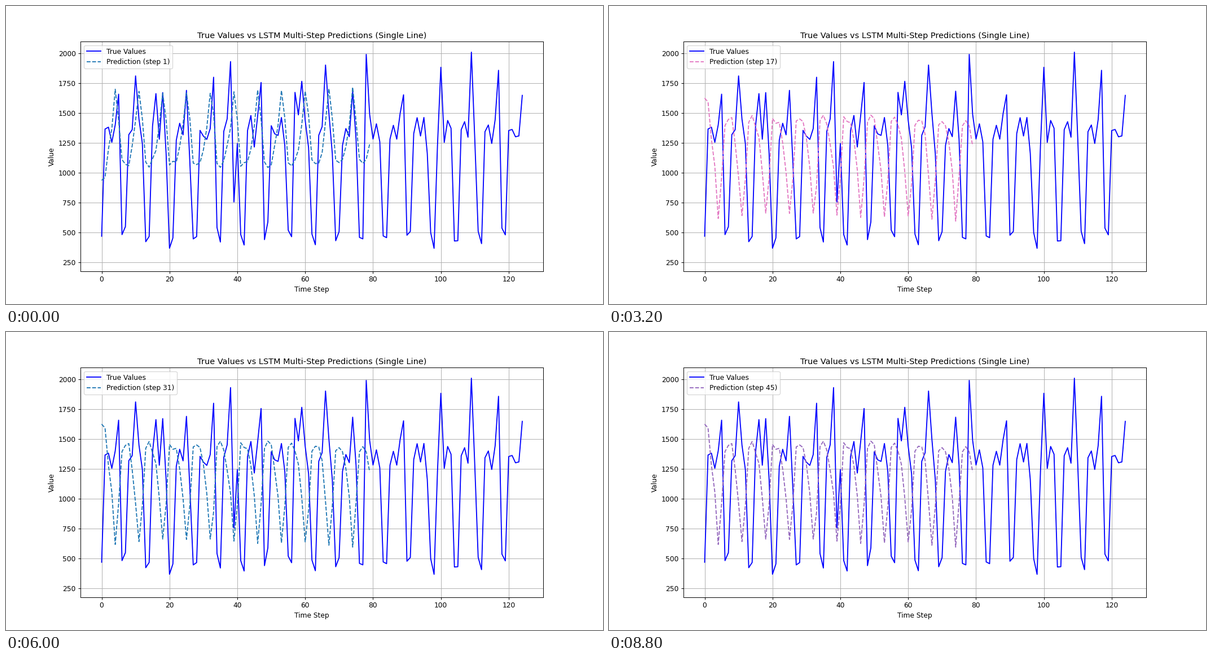
Animation of 1058x529 px, one loop 9000 ms. Source, as a matplotlib script:

```python
import numpy as np
import matplotlib.pyplot as plt
from matplotlib.animation import FuncAnimation

plt.rcParams["font.family"] = "DejaVu Sans"

STEPS = 45
INTERVAL = 200
rng = np.random.default_rng(7)

# Both series repeat weekly; each profile starts at day 0.
VALUE_WEEK = np.array([470, 1350, 1400, 1310, 1430, 1240, 480])
FORECAST_WEEK = np.array([1070, 1095, 1200, 1410, 1685, 1460, 1095])
# Response of a forecast to the weekly signal, by step modulo 7.
GAINS = [0.76, 1, -0.08, -1.32, -1.08, 0.04, 0.54]
MEAN = 1235

# Outstanding days on top of the weekly rhythm.
EXTREMES = {
    5: 1660, 10: 1813, 16: 1665, 18: 1673, 25: 1692, 33: 1802, 38: 1933,
    39: 757, 47: 1758, 57: 1675, 59: 1768, 66: 1904, 74: 1685, 78: 1993,
    89: 1655, 100: 1885, 109: 2012, 117: 1860, 124: 1650,
}


def weekly_series(profile, length, spread):
    days = np.arange(length)
    return profile[days % 7] + rng.normal(0, spread, length)


true_values = weekly_series(VALUE_WEEK, 125, 60)
true_values[list(EXTREMES)] = list(EXTREMES.values())

signal = weekly_series(FORECAST_WEEK, 80, 22) - MEAN
signal -= 140 * np.exp(-np.arange(80.0) ** 2 / 2)  # warm-up of the model


def prediction(step):
    return MEAN + GAINS[step % 7] * signal


fig, ax = plt.subplots(figsize=(12, 6), dpi=88.1667)
ax.plot(true_values, color="blue", label="True Values")
ax.set_xlim(-6.2, 130.2)
ax.set_ylim(177, 2099)
ax.set_title("True Values vs LSTM Multi-Step Predictions (Single Line)",
             fontsize=11.85, pad=5)
ax.set_xlabel("Time Step")
ax.set_ylabel("Value", labelpad=3.5)
ax.grid(True)
line, = ax.plot(signal, "--")


def update(frame):
    step = frame + 1
    line.set_ydata(prediction(step))
    line.set_color(f"C{frame % 10}")
    line.set_label(f"Prediction (step {step})")
    return line, ax.legend(loc="upper left", labelspacing=0.45)


update(0)
anim = FuncAnimation(fig, update, frames=STEPS, interval=INTERVAL, repeat=True)
plt.show()
```
